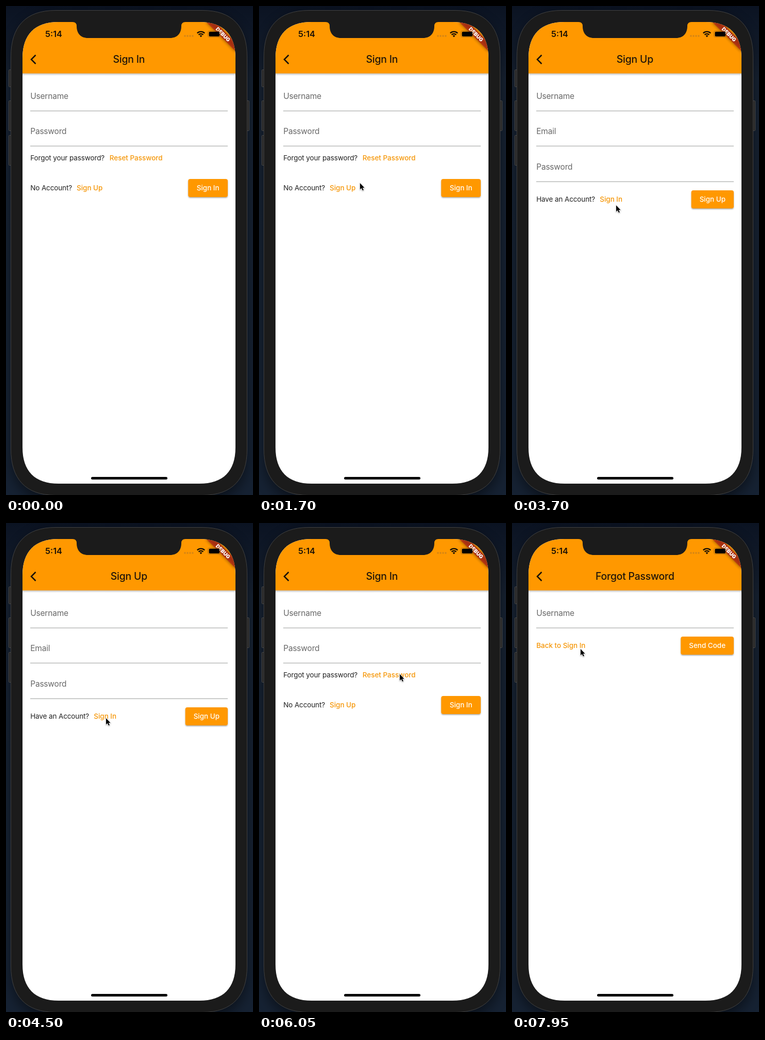
Write an HTML page that moves like this. It is 479 px wide and 947 px high and loops after 8 s.

```html
<!DOCTYPE html>
<html lang="en">
<head>
<meta charset="utf-8">
<title>Sign-in flow</title>
<style>
html, body { margin: 0; height: 100%; overflow: hidden; background: #121b2a; }
svg { display: block; width: 100vw; height: 100vh; }
text { font-family: Inter, Roboto, sans-serif; }
.title { font-size: 19.4px; font-weight: 500; letter-spacing: -.2px; fill: #21160a; text-anchor: middle; }
.label { font-size: 15.5px; letter-spacing: -.2px; fill: #686868; }
.note { font-size: 13.5px; letter-spacing: -.12px; fill: #212121; }
.link, .action { font-size: 13.5px; font-weight: 500; letter-spacing: -.03px; fill: #f59607; }
.action { fill: #fff; text-anchor: middle; }
</style>
</head>
<body>
<svg viewBox="0 0 479 947">
  <defs>
    <clipPath id="screen"><path d="M32 101C32 55 56 31 102 31H375C421 31 445 55 445 101V855C445 901 421 925 375 925H102C56 925 32 901 32 855Z"/></clipPath>
    <linearGradient id="bar" x2="0" y2="1"><stop stop-color="#000" stop-opacity=".26"/><stop offset="1" stop-color="#000" stop-opacity="0"/></linearGradient>
    <linearGradient id="sky" x2="0" y2="1"><stop stop-color="#0b1322"/><stop offset=".15" stop-color="#172232"/><stop offset="1" stop-color="#162233"/></linearGradient>
    <filter id="soft" x="-20%" y="-60%" width="140%" height="220%"><feGaussianBlur stdDeviation="3"/></filter>
    <filter id="glow" x="-20%" y="-20%" width="140%" height="140%"><feGaussianBlur stdDeviation="12"/></filter>
    <filter id="lift" x="-20%" y="-30%" width="140%" height="180%"><feDropShadow dx="0" dy="1.5" stdDeviation="1.3" flood-opacity=".36"/></filter>
  </defs>

  <rect width="479" height="947" fill="url(#sky)"/>
  <rect x="10" y="14" width="458" height="950" rx="84" opacity=".45" filter="url(#glow)"/>
  <g fill="#272727" stroke="#484848">
    <rect x="5.5" y="123.500" width="8" height="33" rx="1"/>
    <rect x="5.5" y="183.500" width="8" height="58" rx="1"/>
    <rect x="5.5" y="250.500" width="8" height="58" rx="1"/>
    <rect x="464.500" y="183.500" width="7" height="58" rx="1"/>
  </g>
  <path d="M9.500 98C9.500 40 38 8.500 96 8.500H381C439 8.500 467.500 40 467.500 98V858C467.500 916 439 947.500 381 947.500H96C38 947.500 9.500 916 9.500 858Z" fill="#1b1b1b" stroke="#414141"/>

  <g clip-path="url(#screen)">
    <path fill="#fff" d="M32 31h413v894H32z"/>
    <path fill="url(#bar)" d="M32 130h413v5H32z"/>
    <path fill="#ff9800" d="M32 31h413v99.500H32z"/>
    <path d="M57.500 95L49 103.500L57.500 112" fill="none" stroke="#181008" stroke-width="2.500"/>
    <g id="pages"></g>
    <g transform="translate(445 31) rotate(45)">
      <rect x="-40" y="28" width="80" height="12" opacity=".5" filter="url(#soft)"/>
      <rect x="-40" y="28" width="80" height="12" fill="#b71c1c" fill-opacity=".627"/>
      <text y="37.700" font-size="10" font-weight="900" fill="#fff" text-anchor="middle">DEBUG</text>
    </g>
    <text x="76" y="60.300" font-size="16.300" font-weight="600" fill="#1a1005">5:14</text>
    <g fill="#d18417">
      <circle cx="347" cy="58" r="1.700"/><circle cx="352" cy="58" r="1.700"/>
      <circle cx="357" cy="58" r="1.700"/><circle cx="362" cy="58" r="1.700"/>
    </g>
    <g fill="none" stroke="#140d04" stroke-width="2.300">
      <path d="M370.800 52.600a10.300 10.300 0 0 1 14.400 0"/>
      <path d="M373.500 55.700a6.400 6.400 0 0 1 9 0"/>
    </g>
    <path d="M375.600 57.600a3.500 3.500 0 0 1 4.800 0L378 60.400Z" fill="#140d04"/>
    <rect x="391.500" y="48" width="24" height="12.500" rx="3.500" fill="none" stroke="#a76a12" stroke-width=".8"/>
    <rect x="393.500" y="49.700" width="20.500" height="9.300" rx="2"/>
  </g>
  <path d="M129 30H348V31Q340 31 340 39C340 53 332 62 318 62H159C145 62 137 53 137 39Q137 31 129 31Z" fill="#1b1b1b"/>
  <rect x="165" y="912" width="148" height="5" rx="2.500"/>
  <g id="cursor">
    <path d="M0 0V12.200L2.800 9.700L5 14.300L7 13.400L4.900 8.900H8.600Z" stroke="#fff" stroke-width="1.400" paint-order="stroke" style="filter:drop-shadow(0 1px 1px #0005)"/>
  </g>
</svg>
<script>
const LOOP = 8000;
const text = (kind, x, y, words) => `<text class="${kind}" x="${x}" y="${y}">${words}</text>`;

const field = (name, i) => {
  const y = 179.5 + i * 68.6;
  return text("label", 47.2, y, name) +
    `<path d="M47 ${Math.round(y + 23) + .2}H430" stroke="#979a99"/>`;
};

const button = (x, y, words) =>
  `<rect x="${x}" y="${y}" width="${430 - x}" height="35" rx="4" fill="#ff9800" filter="url(#lift)"/>` +
  text("action", (x + 430) / 2, y + 22.2, words);

const page = (title, fields, ...rest) =>
  `<g>${text("title", 238.4, 110, title)}${fields.map(field).join("")}${rest.join("")}</g>`;

const pages = document.getElementById("pages");
pages.innerHTML =
  page("Sign In", ["Username", "Password"],
    text("note", 47.2, 299, "Forgot your password?"),
    text("link", 200.8, 299, "Reset Password"),
    text("note", 47.2, 357, "No Account?"),
    text("link", 137, 357, "Sign Up"),
    button(353.3, 335, "Sign In")) +
  page("Sign Up", ["Username", "Email", "Password"],
    text("note", 47.2, 379, "Have an Account?"),
    text("link", 170.3, 379, "Sign In"),
    button(347.7, 357, "Sign Up")) +
  page("Forgot Password", ["Username"],
    text("link", 47.2, 242, "Back to Sign In"),
    button(327.3, 220, "Send Code"));

// Start time and page index
const views = [[0, 0], [2150, 1], [4700, 0], [6600, 2]];

// Pointer path: time, x, y
const path = [
  [100, 436, 452], [500, 325, 392], [900, 238, 345], [1300, 206, 341],
  [1700, 196, 343], [2050, 164, 352], [2700, 164, 352], [2900, 200, 383],
  [3200, 207, 402], [3500, 205, 397], [3700, 202, 386], [3950, 202, 386],
  [4100, 196, 381], [4400, 196, 381], [4500, 194, 378], [5050, 194, 378],
  [5250, 262, 333], [5650, 273, 293], [7150, 273, 292], [7250, 231, 299],
  [7400, 208, 300], [7700, 155, 262], [7950, 133, 244]
];

const cursor = document.getElementById("cursor");

function draw(now) {
  const t = now % LOOP;
  const current = views.findLast(v => v[0] <= t)[1];
  [...pages.children].forEach((p, i) => p.style.display = i === current ? "" : "none");

  const i = path.findLastIndex(p => p[0] <= t);
  cursor.style.display = i < 0 ? "none" : "";
  if (i >= 0) {
    const a = path[i], b = path[i + 1] || a;
    const k = (t - a[0]) / (b[0] - a[0] || 1);
    const at = n => b === a ? a[n] : a[n] + (b[n] - a[n]) * k;
    cursor.setAttribute("transform", `translate(${at(1)} ${at(2)})`);
  }
  requestAnimationFrame(draw);
}
draw(performance.now());
</script>
</body>
</html>
```
